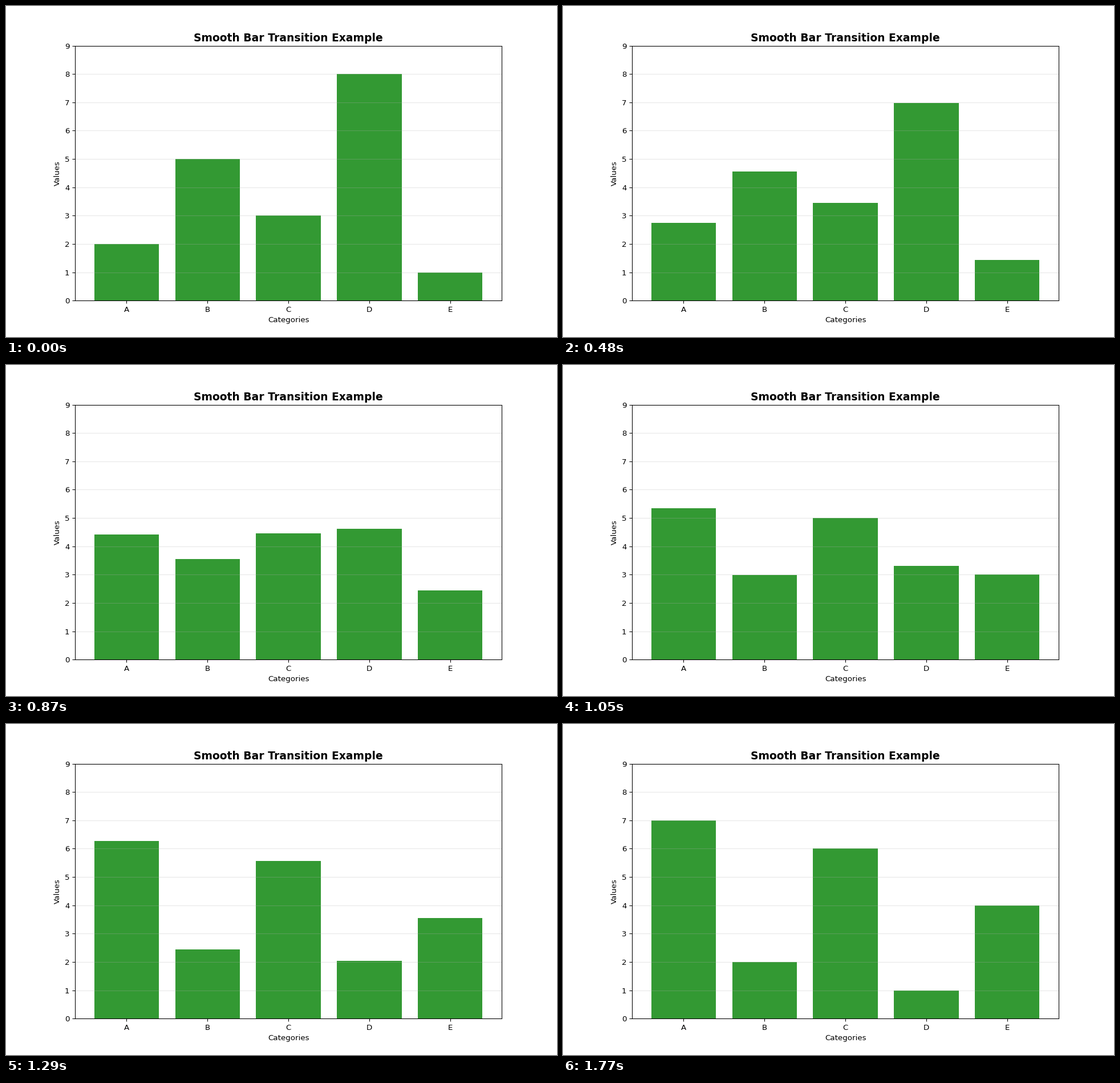
Write a matplotlib script that moves like this. It is 966 px wide and 580 px high and loops after 1.8 s.

```python
import matplotlib.pyplot as plt
import numpy as np
from matplotlib.animation import FuncAnimation

FRAMES = 60
INTERVAL = 30  # ms
DPI = 96.6

labels = ["A", "B", "C", "D", "E"]
start = np.array([2, 5, 3, 8, 1])
end = np.array([7, 2, 6, 1, 4])

fig, ax = plt.subplots(figsize=(966 / DPI, 580 / DPI), dpi=DPI)
bars = ax.bar(labels, start, color="green", alpha=0.8)
ax.set_ylim(0, 9)
ax.set_title("Smooth Bar Transition Example", fontsize=14, fontweight="bold")
ax.set_xlabel("Categories")
ax.set_ylabel("Values")
ax.grid(axis="y", alpha=0.3)


def ease_in_out_quad(t):
    return 2 * t * t if t < 0.5 else 1 - 2 * (1 - t) ** 2


def update(frame):
    p = ease_in_out_quad(frame / (FRAMES - 1))
    for bar, height in zip(bars, start + (end - start) * p):
        bar.set_height(height)
    return list(bars)


anim = FuncAnimation(fig, update, frames=FRAMES, interval=INTERVAL,
                     repeat=True, repeat_delay=0, blit=False)
plt.show()
```
